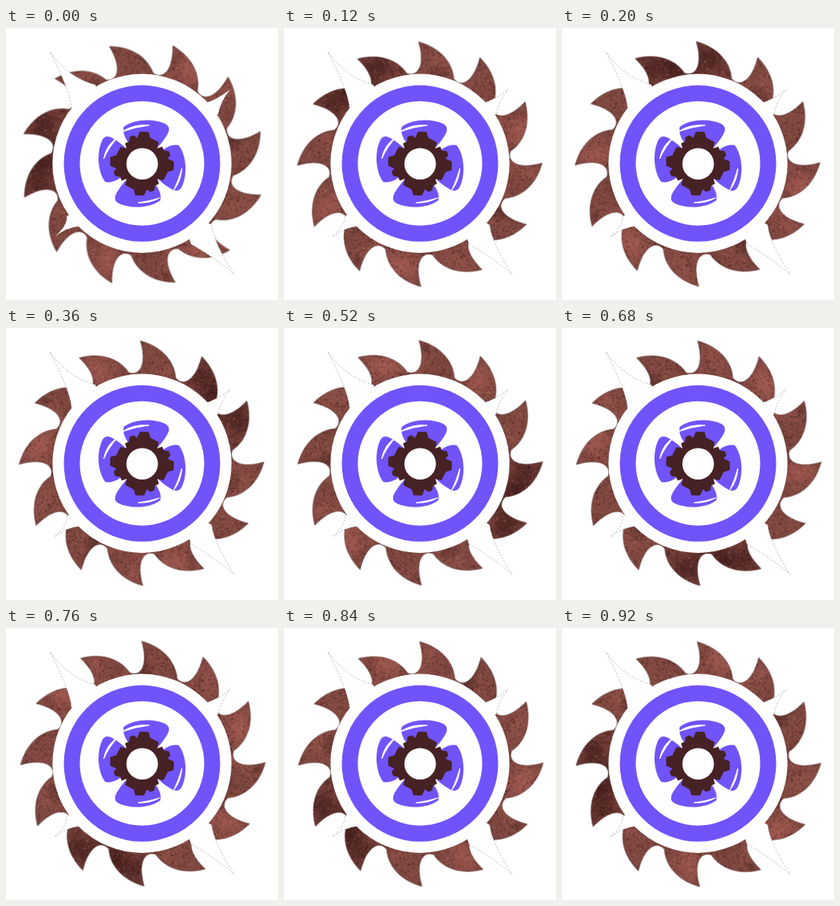
These frames come from a looping animation (341x341 px, 960 ms). An HTML page with a canvas:

```html
<!DOCTYPE html>
<html lang="en">
<head>
<meta charset="utf-8">
<title>Spinning saw blade</title>
<style>
html, body { margin: 0; width: 100%; height: 100%; overflow: hidden; background: #fff; }
canvas { display: block; width: 100vw; height: 100vh; }
</style>
</head>
<body>
<canvas id="stage" width="341" height="341"></canvas>
<script>
const SIZE = 341, STEP_MS = 40, STEPS = 24, TEETH = 12;
const RAD = Math.PI / 180;
const PURPLE = '#7153fa', DARK = '#462224';
const ctx = document.getElementById('stage').getContext('2d');

const polar = (deg, r) => [r * Math.cos(deg * RAD), r * Math.sin(deg * RAD)];

function makeLayer(draw) {
  const layer = document.createElement('canvas');
  layer.width = layer.height = SIZE;
  draw(layer.getContext('2d'));
  return layer;
}

function seeded(seed) {
  return () => {
    seed = (seed * 1664525 + 1013904223) >>> 0;
    return seed / 4294967296;
  };
}

function disc(g, x, y, r, color) {
  g.fillStyle = color;
  g.beginPath();
  g.arc(x, y, r, 0, 2 * Math.PI);
  g.fill();
}

// Blade outline around the origin; each tooth hooks counter-clockwise.
function bladePath() {
  const path = new Path2D();
  for (let i = 0; i < TEETH; i++) {
    const a = i * 360 / TEETH + 14.4;
    if (i === 0) path.moveTo(...polar(a, 153.5));
    path.bezierCurveTo(...polar(a + 9, 149), ...polar(a + 18, 137), ...polar(a + 22.5, 115));
    path.bezierCurveTo(...polar(a + 29, 109), ...polar(a + 34, 123), ...polar(a + 30, 153.5));
  }
  path.closePath();
  return path;
}

function drawBlade(g) {
  const rand = seeded(77);
  const path = bladePath();
  const shade = '45,14,14', rust = '178,98,90';
  g.translate(SIZE / 2, SIZE / 2);
  g.save();
  g.clip(path);
  g.fillStyle = '#7f4840';
  g.fillRect(-160, -160, 320, 320);

  const blotch = (deg, r, size, rgb, alpha) => {
    const [x, y] = polar(deg, r);
    const fade = g.createRadialGradient(x, y, 0, x, y, size);
    fade.addColorStop(0, `rgba(${rgb},${alpha})`);
    fade.addColorStop(1, `rgba(${rgb},0)`);
    g.fillStyle = fade;
    g.fillRect(x - size, y - size, 2 * size, 2 * size);
  };
  for (let i = 0; i < 90; i++) {
    const rgb = rand() < 0.5 ? shade : rust;
    blotch(rand() * 360, 108 + rand() * 45, 6 + rand() * 13, rgb, 0.25);
  }
  for (const deg of [170, 186, 203]) blotch(deg, 130, 38, shade, 0.6);
  for (const deg of [-65, 55, 108]) blotch(deg, 130, 32, rust, 0.6);

  for (let i = 0; i < 6000; i++) {
    const [x, y] = polar(rand() * 360, 106 + rand() * 48);
    const s = 0.8 + rand() * 1.3;
    g.fillStyle = rand() < 0.55 ? 'rgba(45,16,15,.28)' : 'rgba(195,122,110,.25)';
    g.fillRect(x, y, s, s);
  }
  g.restore();
  g.strokeStyle = 'rgba(60,25,24,.55)';
  g.lineWidth = 0.7;
  g.stroke(path);
}

function drawSpikes(g) {
  const spikes = [
    'M82 100 Q81 80 55 30 Q79 63 112 71 L130 130 Z',
    'M258 247 Q260 268 286 309 Q262 288 232 271 L215 220 Z',
    'M249 94 Q263 91 281 77 Q269 92 266 108 L230 120 Z',
    'M76 236 Q78 246 61 262 Q75 250 95 248 L115 215 Z'
  ];
  g.fillStyle = '#fff';
  g.strokeStyle = 'rgba(90,90,95,.7)';
  g.lineWidth = 0.6;
  g.setLineDash([2, 2]);
  for (const d of spikes) {
    g.fill(new Path2D(d));
    g.stroke(new Path2D(d.split(' L')[0]));
  }
  g.setLineDash([]);
}

function drawHub(g) {
  g.save();
  g.translate(170.5, 170);

  const petal = new Path2D('M-23 -46 C-10 -56 14 -57 29 -50 Q37 -46 32 -37 Q25 -25 16 -17 L0 -10 L-17 -26 Q-25 -37 -23 -46 Z');
  g.fillStyle = PURPLE;
  for (let i = 0; i < 4; i++) {
    g.fill(petal);
    g.rotate(Math.PI / 2);
  }

  // Each quarter of the gear has a small and a large tooth, then a split.
  const quarter = [[-30, 31], [-24, 36], [-17, 36], [-11, 31], [-3, 39], [11, 39.5], [17, 33], [37, 33], [45, 25], [51, 32]];
  g.fillStyle = g.strokeStyle = DARK;
  g.lineWidth = 2;
  g.lineJoin = 'round';
  g.beginPath();
  for (let i = 0; i < 4; i++) {
    for (const [deg, r] of quarter) g.lineTo(...polar(i * 90 + deg, r));
  }
  g.closePath();
  g.fill();
  g.stroke();

  const glints = [
    'M-25 -40 Q-10 -50 9 -48 Q-8 -46 -25 -40 Z',
    'M-48 -6 Q-45 -24 -29 -34 Q-41 -22 -48 -6 Z',
    'M22 43 Q10 50 -5 49 Q10 47 22 43 Z',
    'M50 6 Q49 22 40 33 Q46 20 50 6 Z'
  ];
  g.fillStyle = g.strokeStyle = '#fff';
  g.lineWidth = 1;
  for (const d of glints) {
    const glint = new Path2D(d);
    g.fill(glint);
    g.stroke(glint);
  }
  g.restore();
  disc(g, 170.7, 170.3, 19.8, '#fff');
}

function drawCover(g) {
  drawSpikes(g);
  disc(g, 170.5, 169.7, 112.2, '#fff');
  disc(g, 170.5, 169.8, 98, PURPLE);
  disc(g, 170.5, 169.8, 78, '#fff');
  drawHub(g);
}

const blade = makeLayer(drawBlade);
const cover = makeLayer(drawCover);

function render() {
  const step = Math.floor(performance.now() / STEP_MS) % STEPS;
  ctx.fillStyle = '#fff';
  ctx.fillRect(0, 0, SIZE, SIZE);
  ctx.save();
  ctx.translate(170.7, 170);
  ctx.rotate(step * 2 * Math.PI / STEPS);
  // The blade sits slightly off its axle.
  ctx.drawImage(blade, -SIZE / 2 + 0.2, -SIZE / 2 + 0.9);
  ctx.restore();
  ctx.drawImage(cover, 0, 0);
  requestAnimationFrame(render);
}
render();
</script>
</body>
</html>
```
